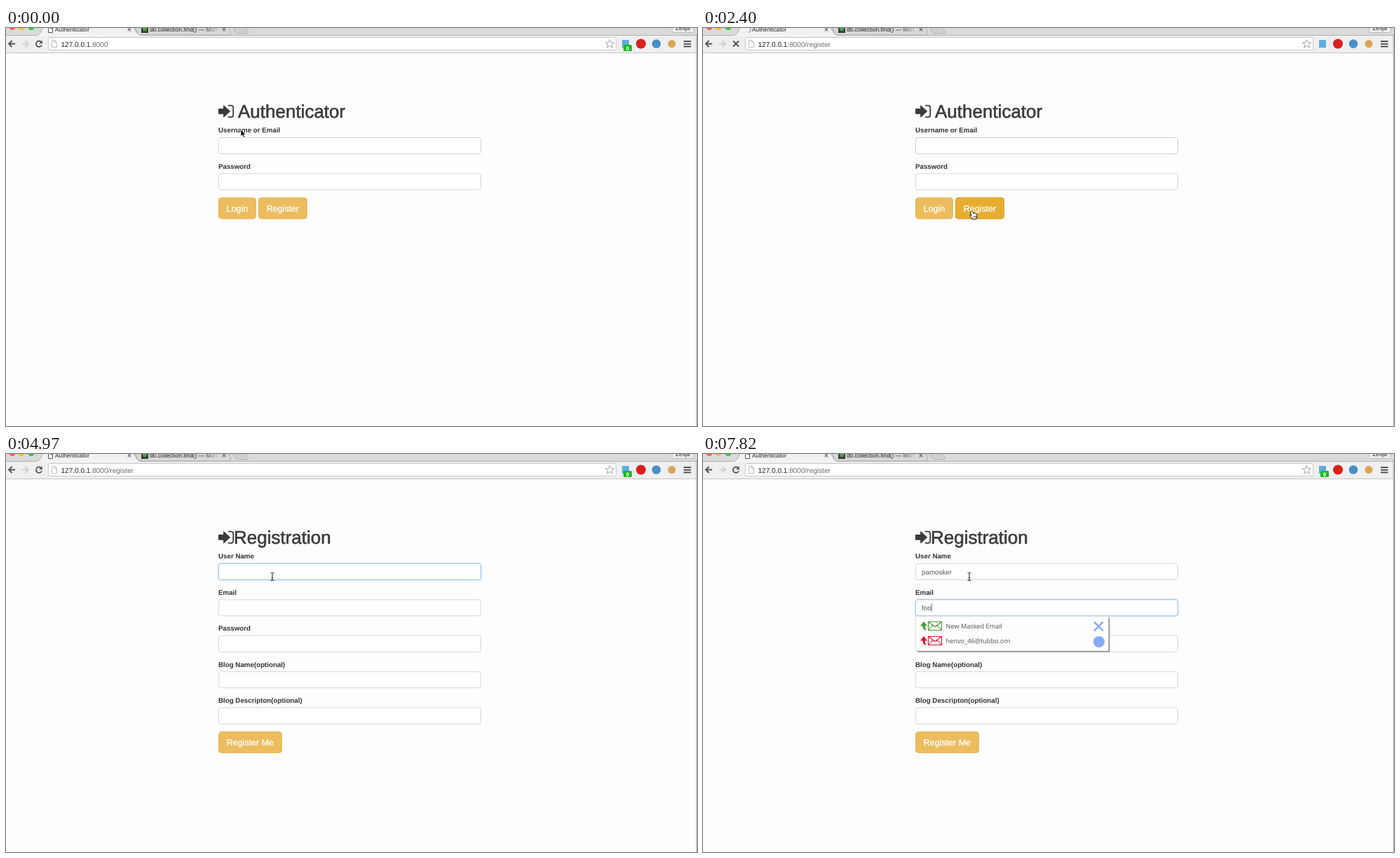
Recreate the animation shown at these times as an HTML page. Size 986 by 568 pixels, loop 8 s.

```html
<!DOCTYPE html>
<html lang="en">
<head>
<meta charset="utf-8">
<title>Authenticator</title>
<style>
  html, body { margin: 0; width: 100%; height: 100%; overflow: hidden; background: #fdfdfd; }
  svg { display: block; }
  text { font-family: "Liberation Sans", Arial, sans-serif; text-rendering: geometricPrecision; white-space: pre; }
  .heading { font-size: 26px; fill: #3b3b3b; stroke: #3b3b3b; stroke-width: .6px; }
  .label { font-size: 9.75px; font-weight: bold; fill: #333; }
  .value { font-size: 9.8px; fill: #555; }
  .button { font-size: 12.5px; fill: #fff; stroke: #fff; stroke-width: .3px; }
  .tab { font-size: 8.3px; fill: #222; }
  .url { font-size: 10.05px; fill: #6a6a6a; }
  .menu { font: 9.2px "Open Sans", sans-serif; fill: #505050; }
  .glow { filter: drop-shadow(0 0 1.8px rgba(102, 175, 233, .4)); }
</style>
</head>
<body>
<svg id="stage" width="986" height="568" viewBox="0 0 986 568"></svg>
<script>
const LOOP = 8000, ROW = 51.4;
const USER = 'pamosker', MASKED = 'henvo_46@tubbo.om', PROFILE = 'Zefija';
const stage = document.getElementById('stage');

// Each step changes part of the state from its time (ms) onward.
const steps = [
  [0, { page: 'login', cursor: ['arrow', 335, 145], badge: true, hover: 0, field: 0, focus: 0, blur: 0, caret: false, user: '', mail: '', menu: 0 }],
  [150, { cursor: ['arrow', 339, 151] }],
  [310, { cursor: ['beam', 347, 165] }],
  [470, { cursor: ['beam', 350, 171] }],
  [770, { focus: .5, caret: true }],
  [910, { focus: 1, cursor: ['beam', 366, 215] }],
  [1060, { cursor: ['hand', 380, 256] }],
  [1210, { hover: .6, cursor: ['hand', 385, 265] }],
  [1360, { hover: 1, cursor: ['hand', 386, 267], caret: false }],
  [1810, { caret: true }],
  [2250, { focus: .6, caret: false }],
  [2400, { focus: .2, loading: 1, badge: false }],
  [2550, { focus: 0, loading: 2 }],
  [2700, { page: 'register', loading: 0 }],
  [2850, { cursor: ['beam', 383, 215] }],
  [3000, { cursor: ['beam', 381, 181], badge: true }],
  [3170, { cursor: ['beam', 380, 175] }],
  [3470, { focus: .5, caret: true }],
  [3620, { focus: 1 }],
  [3920, { caret: false }],
  [4520, { caret: true }],
  [4970, { caret: false }],
  [5120, { caret: true, user: USER.slice(0, 1) }],
  [5270, { user: USER.slice(0, 3) }],
  [5420, { user: USER.slice(0, 4) }],
  [5720, { user: USER.slice(0, 5) }],
  [5870, { user: USER.slice(0, 6) }],
  [6020, { user: USER.slice(0, 7) }],
  [6170, { user: USER }],
  [6620, { field: 1, focus: .5, blur: .5 }],
  [6770, { focus: 1, blur: 0, menu: .5 }],
  [6920, { menu: .8 }],
  [7070, { menu: 1 }],
  [7220, { caret: false }],
  [7520, { caret: true, mail: 'f' }],
  [7670, { mail: 'fo' }],
  [7820, { mail: 'foo' }]
];

const text = (cls, x, y, s, extra = '') => `<text class="${cls}" x="${x}" y="${y}" ${extra}>${s}</text>`;
const rect = (x, y, w, h, fill, extra = '') => `<rect x="${x}" y="${y}" width="${w}" height="${h}" fill="${fill}" ${extra}/>`;
const dot = (x, y, r, fill) => `<circle cx="${x}" cy="${y}" r="${r}" fill="${fill}"/>`;
const path = (d, fill, stroke = 'none', width = 1, extra = '') =>
  `<path d="${d}" fill="${fill}" stroke="${stroke}" stroke-width="${width}" ${extra}/>`;
const cross = (x, y, r, color, width) =>
  path(`M${x - r} ${y - r}l${2 * r} ${2 * r}m0 ${-2 * r}l${-2 * r} ${2 * r}`, 'none', color, width);
const sheet = (x, y, w, h, stroke) =>
  path(`M${x} ${y}h${w - 3}l3 3v${h - 3}h${-w}zM${x + w - 3} ${y}v3h3`, '#fff', stroke);

function tabs(s) {
  const spinner = path('M66 -1a3.5 3.5 0 0 1 1 6', 'none', '#6f8fae', 1.2, `transform="rotate(${s.loading * 30} 64 2)"`);
  return rect(0, 0, 986, 10, '#dadada') +
    dot(9, -1.5, 4.5, '#f95f57') + dot(22, -1.5, 4.5, '#f8bd2e') + dot(36, -1.5, 4.5, '#2bc840') +
    path('M184 -1L189 10H318Q322 9 320 4L318 -1z', '#d8d8d8', '#aaa') +
    path('M323 -1L327 6Q328 8 331 8H344Q347 8 345 5L342 -1z', '#cfcfcf', '#b5b5b5') +
    path('M0 10.5H43Q48 10 50 5L53 -1H182L186 6Q188 10 193 10.5H986', '#f1f1f1', '#b2b2b2') +
    (s.loading ? spinner : sheet(60.5, -2.5, 6, 9, '#555')) +
    text('tab', 70, 5, 'Authenticator') + cross(176, 2.2, 2.2, '#666', 1.1) +
    rect(193, -4, 10, 11, '#3f3a35') + dot(198, 1.5, 3, '#3fa34d') +
    text('tab', 205, 5, 'db.collection.find() — <tspan fill="#555">M</tspan><tspan fill="#888">o</tspan><tspan fill="#aaa">n</tspan>') +
    cross(311, 2.2, 2.2, '#666', 1.1) +
    rect(950.5, -4.5, 31, 11, '#ececec', 'stroke="#bbb" rx="2"') + text('tab', 955.5, 2.5, PROFILE);
}

function toolbar(s) {
  const arrow = (x, dir, color) => path(`M${x} 22.5h${dir * 9}M${x + dir * 4.5} 18l${-dir * 4.5} 4.5 ${dir * 4.5} 4.5`, 'none', color, 1.9);
  const reload = path('M50.3 20A4.2 4.2 0 1 0 51 24.2', 'none', '#555', 1.8) + path('M51.8 17.5v4.8h-4.8z', '#555');
  const route = s.loading || s.page === 'register' ? '/register' : '';
  return rect(0, 11, 986, 24, '#efefef') + rect(0, 35, 986, 1, '#c6c6c6') +
    arrow(4, 1, '#555') + arrow(32, -1, '#d0d0d0') +
    (s.loading ? cross(47, 22.5, 4, '#555', 2) : reload) +
    rect(60.5, 13.5, 810, 18, '#fff', 'stroke="#c8c8c8" rx="2"') + sheet(65.5, 17.5, 7, 10, '#bbb') +
    text('url', 78.5, 26.5, `<tspan fill="#222">127.0.0.1</tspan>:8000${route}`) +
    path('M861.5 16.5l1.7 4.1 4.4.3-3.4 2.8 1.1 4.3-3.8-2.4-3.8 2.4 1.1-4.3-3.4-2.8 4.4-.3z', '#fff', '#999', .9) +
    rect(879, 17, 10, 11, '#5eace2') +
    (s.badge ? rect(881, 24, 12, 9, '#1db81d', 'rx="1.5"') +
      text('', 887, 31.5, '0', 'font-size="8" font-weight="bold" fill="#fff" text-anchor="middle"') : '') +
    dot(906, 22.5, 7, '#d8221c') + dot(928, 22.5, 6.3, '#4690c4') + dot(950, 22.5, 5.5, '#dca554') +
    [18, 21.7, 25.4].map(y => rect(967, y, 10.5, 2, '#555')).join('');
}

const fieldBox = (i, stroke, extra = '') =>
  rect(303.5, 156.5 + i * ROW, 374, 23, '#fff', `stroke="${stroke}" rx="2.8" ${extra}`);
const glow = (i, level) => level ? fieldBox(i, '#93c3ee', `class="glow" opacity="${level}"`) : '';

function button(x, y, w, label, hover = 0) {
  const shape = (fill, stroke, extra = '') => rect(x + .5, y + .5, w - 1, 30, fill, `stroke="${stroke}" rx="4" ${extra}`);
  return shape('#ecbc5f', '#eab755') + (hover ? shape('#e8ac30', '#d9a22c', `opacity="${hover}"`) : '') +
    text('button', x + 11.7, y + 20, label);
}

function form(s) {
  const login = s.page === 'login';
  const labels = login ? ['Username or Email', 'Password']
    : ['User Name', 'Email', 'Password', 'Blog Name(optional)', 'Blog Descripton(optional)'];
  const values = [s.user, s.mail];
  return path('M303.5 115.5h7.2v-4.8l9 8.2-9 8.2v-4.8h-7.2z', '#3b3b3b', '#3b3b3b', 1, 'stroke-linejoin="round"') +
    path('M317 110.6h3.9q3.4 0 3.4 3.4v9.8q0 3.4-3.4 3.4H317', 'none', '#3b3b3b', 1.8) +
    text('heading', login ? 331 : 325, 128, login ? 'Authenticator' : 'Registration') +
    labels.map((label, i) => text('label', 303, 149.4 + i * ROW, label) + fieldBox(i, '#d6d6d6')).join('') +
    glow(0, s.blur) + glow(s.field, s.focus) +
    values.map((v, i) => text('value', 312, 171.5 + i * ROW, v)).join('') +
    (login ? button(303, 241.7, 54, 'Login') + button(360, 241.7, 70, 'Register', s.hover)
      : button(303, 395.9, 91, 'Register Me'));
}

function menu(level) {
  if (!level) return '';
  const row = (y, color, label) =>
    path(`M310 ${y}l5-6.5 5 6.5h-3.2q0 4 1.7 6.5-5-1-5-6.5z`, color) +
    path(`M321.5 ${y - 6}h19v12h-19zl9.5 7 9.5-7M321.5 ${y + 6}l6.5-7m12.5 7l-6.5-7`, 'none', color, 1.1) +
    text('menu', 346.5, y + 3.6, label);
  return `<svg x="300" y="225" width="290" height="58" viewBox="300 225 290 58">
    <g opacity="${level}" transform="translate(0 ${29 * (1 - level)})">` +
    rect(306, 234, 274.5, 49, '#999', 'rx="1"') + rect(303.5, 231.5, 275, 49.5, '#fdfdfd', 'stroke="#ccc" stroke-width=".6"') +
    row(245.5, '#4d9a35', 'New Masked Email') + row(266.5, '#dc1730', MASKED) +
    cross(564.5, 246, 6.3, '#86abf8', 2.6) + dot(565, 268, 8, '#86abf8') + '</g></svg>';
}

const cursors = {
  arrow: path('M0 0v9.8l2.3-2.1 1.6 3.6 1.8-.8-1.6-3.5h3.2z', '#000', '#fff', .8),
  beam: path('M-2.5 -5.5q2.5 0 2.5 1.5v8q0 1.5-2.5 1.5M2.5 -5.5q-2.5 0-2.5 1.5m0 8q0 1.5 2.5 1.5M-1.3 1.5h2.6', 'none', '#333', 1.1),
  hand: path('M-3.6-5.2q1.2-.9 2 .5l1.3 2.4q1-.8 1.9 0 1-.6 1.7.2 1.3-.4 1.5 1l.3 3.1-1 2.2v1.6h-5.8l-.5-1.5-3-3.1q-.6-1.4.9-1.3l1.3.9-1.4-4.7q-.2-.9.8-1.3z', '#fff', '#111', 1) +
    path('M.3 1v2.6M2 1v2.6M3.6 1v2.6', 'none', '#111', .7)
};

function draw(s) {
  const [kind, x, y] = s.cursor;
  stage.innerHTML = rect(0, 0, 986, 568, '#fdfdfd') + tabs(s) + toolbar(s) + form(s) + menu(s.menu) +
    rect(984.6, 8, 1.4, 560, '#b9b9b9');
  const typed = stage.querySelectorAll('.value')[s.field].getComputedTextLength();
  const caret = s.caret ? rect(312 + typed, 162 + s.field * ROW, 1, 12, '#666') : '';
  stage.insertAdjacentHTML('beforeend', caret + `<g transform="translate(${x} ${y})">${cursors[kind]}</g>`);
}

let shown = -1;
function tick(now) {
  const t = now % LOOP;
  const current = steps.filter(([start]) => start <= t);
  if (current.length !== shown) {
    shown = current.length;
    draw(Object.assign({}, ...current.map(([, change]) => change)));
  }
  requestAnimationFrame(tick);
}
tick(0);
</script>
</body>
</html>
```
